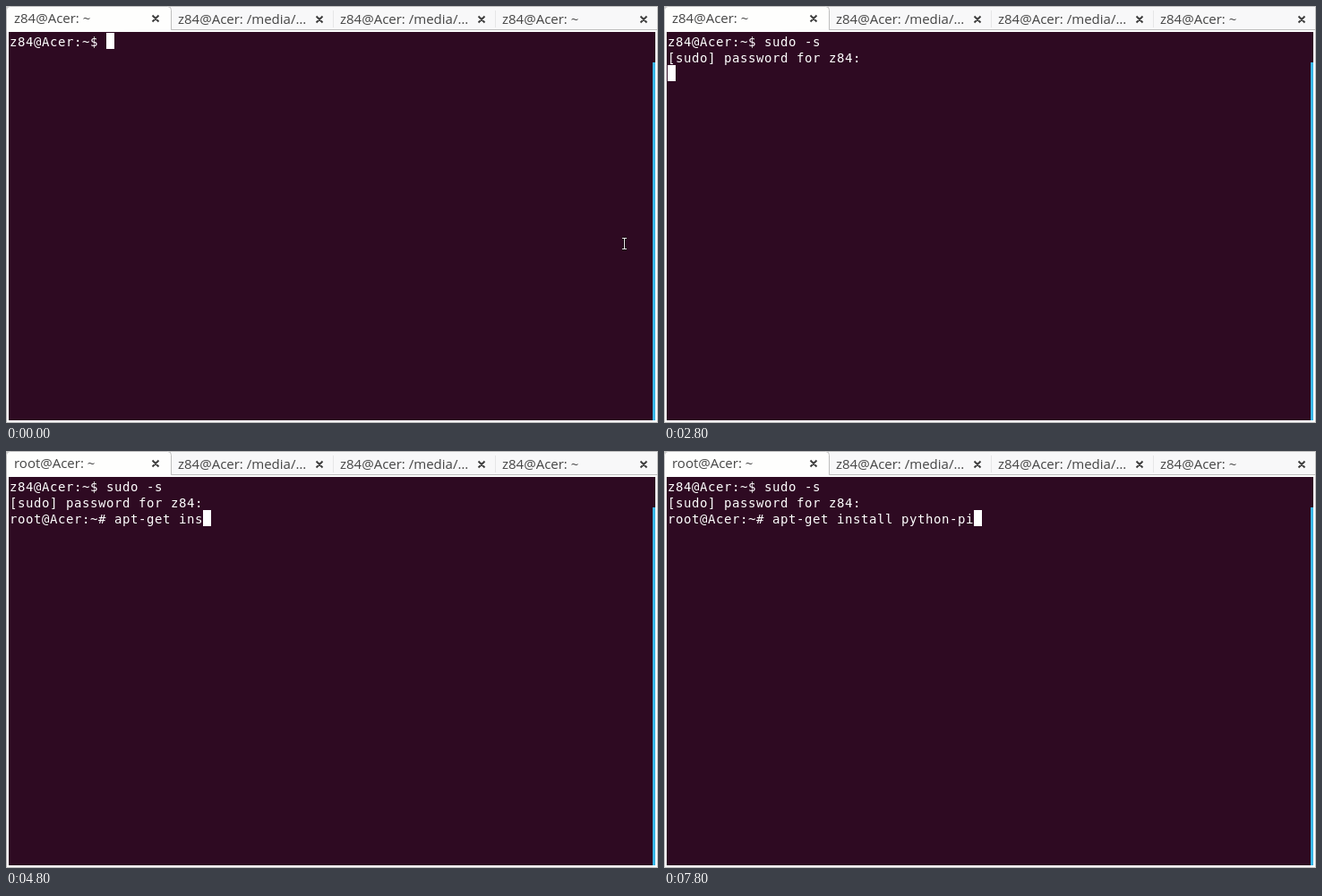
Animation, 728 px wide and 466 px high, one loop 8000 ms. Source, as an HTML page:

```html
<!DOCTYPE html>
<html lang="en">
<head>
<meta charset="utf-8">
<title>Terminal</title>
<style>
  html, body { margin: 0; width: 100%; height: 100%; overflow: hidden; background: #fff; }
  svg, pre, .title, #cursor { position: absolute; }
  svg { left: 0; top: 0; }
  .title { font: 15px/20px "Open Sans", sans-serif; color: #454545; white-space: pre; }
  pre {
    left: 4px; top: 31px; margin: 0; color: #fff;
    font: 14px/18px "DejaVu Sans Mono", monospace;
    letter-spacing: calc(9px - 1ch);
  }
  #cursor { width: 9px; height: 18px; background: #fff; }
</style>
</head>
<body>
<svg width="728" height="466" viewBox="0 0 728 466">
  <rect width="728" height="466" fill="#fdfdfd"/>
  <rect width="728" height="27" fill="#f8f8f9"/>
  <path d="M0 .5H728M184 26.5H728M.5 0V466M727.5 0V466M0 465.5H728" stroke="#bebebe" fill="none"/>
  <path d="M365.5 5V24M546.5 5V24" stroke="#e6e6e7"/>
  <path d="M.5 28V4.5Q.5.5 4.5.5H180.5Q184.5.5 184.5 4.5V26.5" fill="#fefefd" stroke="#bebebe"/>
  <rect x="3" y="29" width="722" height="434" fill="#2e0a22"/>
  <rect x="722" y="63" width="3" height="400" fill="#38b6e6"/>
  <path id="crosses" stroke="#414141" stroke-width="2" fill="none"/>
  <g id="pointer" fill="none">
    <path d="M688 259.5H693M690.5 259V272M688 271.5H693" stroke="#160510" stroke-width="3"/>
    <path d="M688 259.5H693M690.5 259V272M688 271.5H693" stroke="#e8e4e7"/>
  </g>
</svg>
<pre id="screen"></pre>
<div id="cursor"></div>
<script>
const LOOP = 8000;
const userTitle = 'z84@Acer: ~', mediaTitle = 'z84@Acer: /media/…';
const login = 'z84@Acer:~$ ';
const auth = login + 'sudo -s\n[sudo] password for z84: ';
const root = auth + '\nroot@Acer:~# ';
const byId = id => document.getElementById(id);

// Each step: start time, screen text, cursor shown
const typing = (before, text, start, counts) =>
  counts.map((count, i) => [start + i * 200, before + text.slice(0, count), true]);

const steps = [
  [0, login, true],
  ...typing(login, 'sudo -s', 600, [1, 3, 4, 5, 7]),
  [1600, auth, true],
  [2800, auth + '\n', true],
  [3000, root, true],
  ...typing(root, 'apt-get ', 3600, [1, 3, 4, 6, 8]),
  ...typing(root + 'apt-get ', 'install ', 4800, [3, 6, 8]),
  [5800, root + 'apt-get install ', false],
  ...typing(root + 'apt-get install ', 'python-p', 6200, [1, 3, 4, 6, 8]),
  ...typing(root + 'apt-get install ', 'python-pi', 7400, [7, 8, 9])
];

function addTab(text, left, top, crossX) {
  const title = document.createElement('div');
  title.className = 'title';
  title.textContent = text;
  title.style.left = left + 'px';
  title.style.top = top + 'px';
  document.body.append(title);
  const x = crossX - 3.5, y = top + 7.5;
  const cross = `M${x} ${y}l7 7m0 -7l-7 7`;
  byId('crosses').setAttribute('d', (byId('crosses').getAttribute('d') || '') + cross);
  return title;
}

const activeTitle = addTab(userTitle, 9, 3, 167);
addTab(mediaTitle, 192, 4, 350);
addTab(mediaTitle, 373, 4, 531);
addTab(userTitle, 554, 4, 712);

function draw() {
  const time = performance.now() % LOOP;
  const [, text, cursorOn] = steps.findLast(step => step[0] <= time);
  const lines = text.split('\n');
  const cursor = byId('cursor').style;
  byId('screen').textContent = text;
  cursor.left = 4 + 9 * lines.at(-1).length + 'px';
  cursor.top = 12 + 18 * lines.length + 'px';
  cursor.visibility = cursorOn ? 'visible' : 'hidden';
  byId('pointer').style.visibility = time < 600 ? 'visible' : 'hidden';
  activeTitle.textContent = time < 3000 ? userTitle : 'root@Acer: ~';
  requestAnimationFrame(draw);
}
draw();
</script>
</body>
</html>
```
